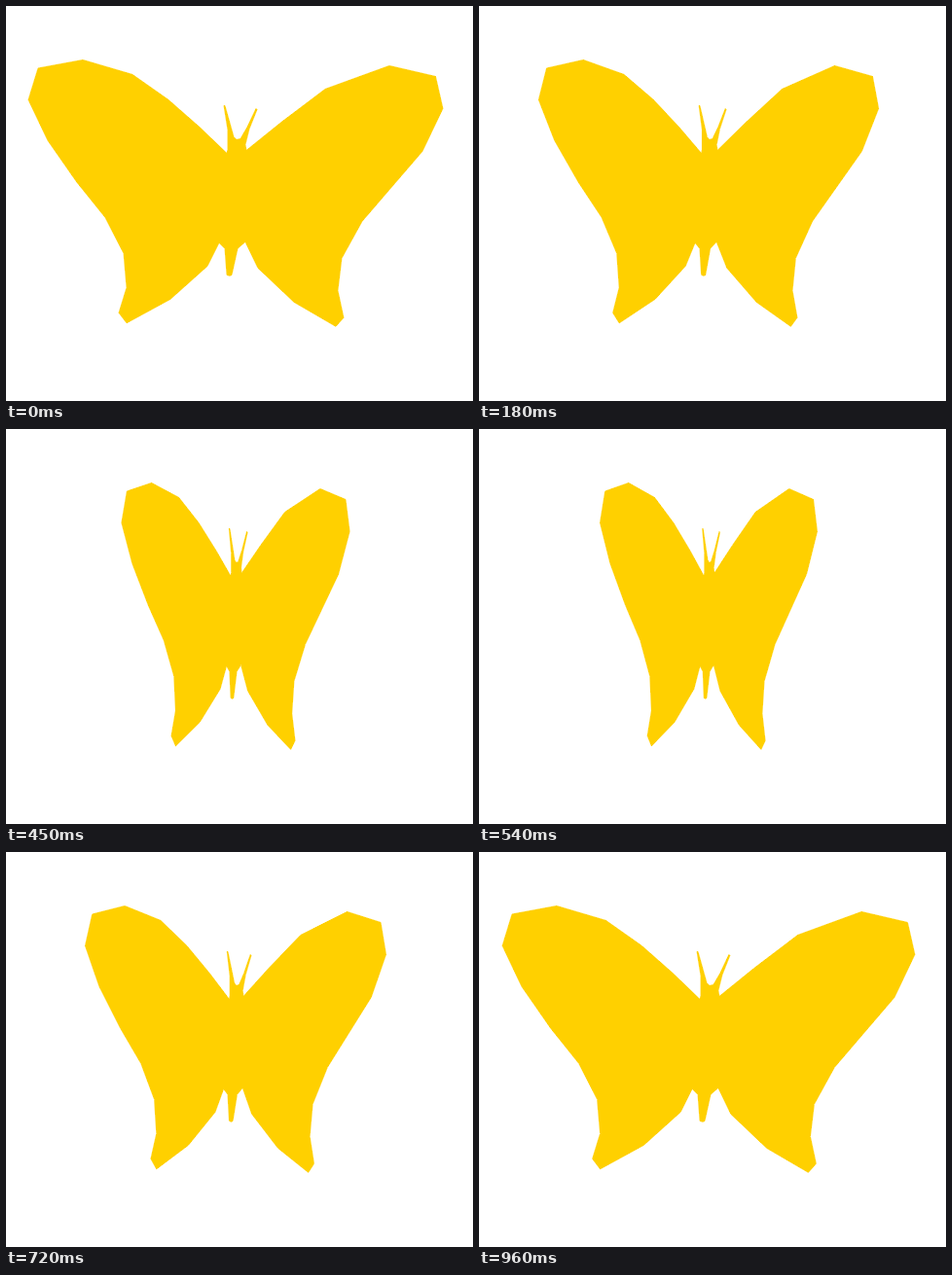
These frames come from a looping animation (480 by 406 pixels, 1860 ms). An HTML page:

```html
<!DOCTYPE html>
<html lang="en">
<head>
<meta charset="utf-8">
<title>Butterfly</title>
<style>
  html, body { margin: 0; height: 100%; overflow: hidden; background: #fff; }
  svg { display: block; width: 100%; height: 100%; }
  polygon {
    fill: #ffd000; stroke: #ffd000; stroke-width: .8; stroke-linejoin: round;
    vector-effect: non-scaling-stroke; shape-rendering: crispEdges;
  }
</style>
</head>
<body>
<svg viewBox="0 0 480 406">
  <polygon id="wings" points="
    33,63.5 79,55 130,70 167,96 200,125 227,151 228,147 228,127 224,102 225,102
    234,134 237,137 241,136 248,124 257,105 258,106 250,126 246,142 247,148
    283,119 328,85 394,61 441.5,72 449,105 428,149 366,221 345,259 341,292
    347,320 339,329 296,304 259,269 246,242 238,249 232,276 230,277 227,276
    225,249 219,243 207,267 169,301 124,325.5 116,315 124,289 121,254 102,217
    73,181 43,138 23,96"/>
</svg>
<script>
  const LOOP = 1860, STEP = 30, CENTER = 236;
  const FOLD = 17, OPEN = 32; // steps at which the wings are folded and open again
  const MIN = 0.49, END = 0.995;
  const wings = document.getElementById('wings');

  function widthAt(step) {
    if (step <= FOLD) return 1 - (1 - MIN) * step / FOLD;
    return MIN + (END - MIN) * (step - FOLD) / (OPEN - FOLD);
  }

  const start = performance.now();
  function draw(now) {
    const time = Math.max(0, now - start) % LOOP;
    const scale = widthAt(Math.min(OPEN, Math.floor(time / STEP)));
    wings.setAttribute('transform',
      `translate(${CENTER * (1 - scale)} 0.4) scale(${scale} 1)`);
    requestAnimationFrame(draw);
  }
  draw(start);
</script>
</body>
</html>
```
